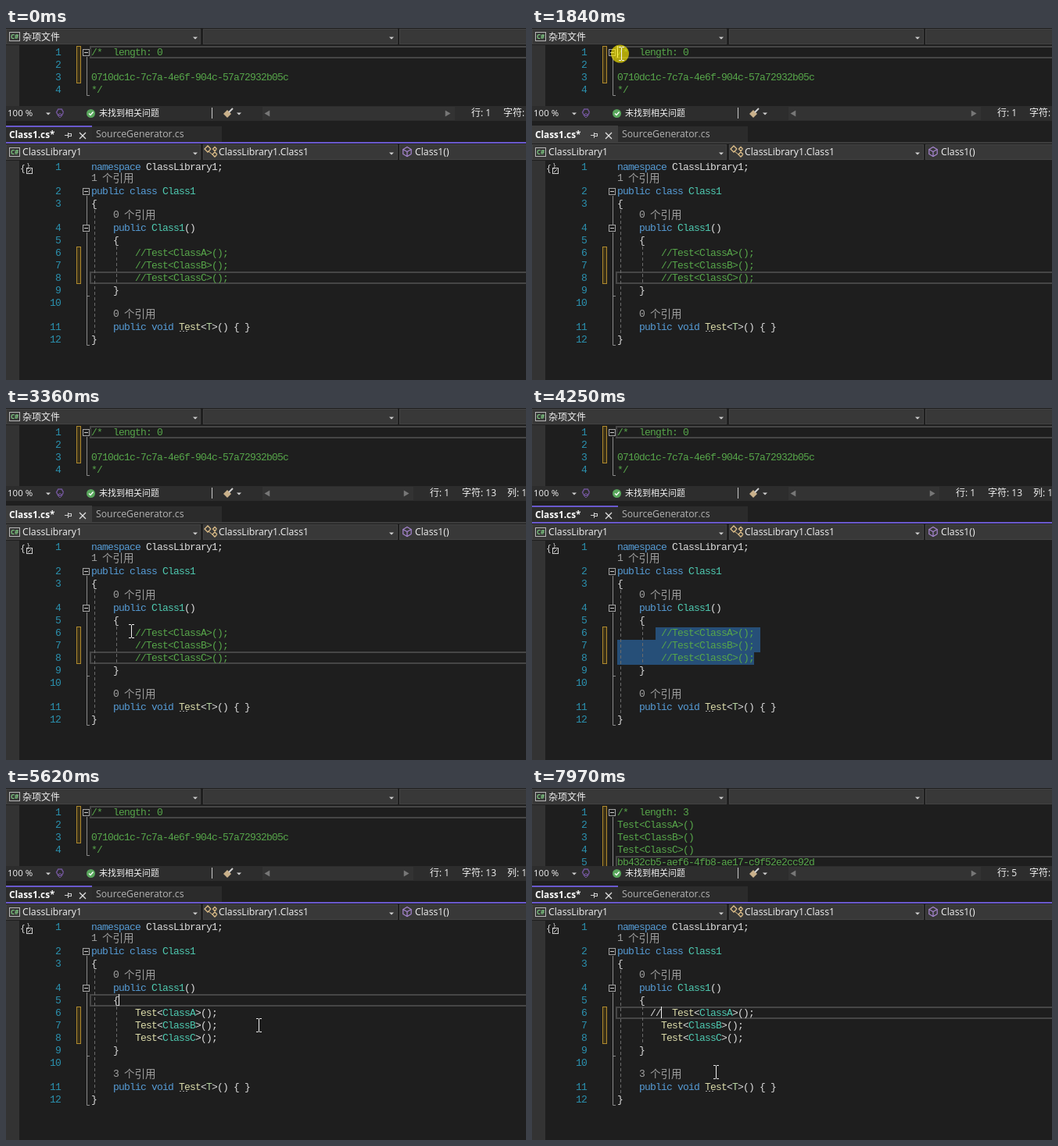
An HTML page with a canvas that plays this animation: 665 by 451 pixels, repeating every 8 s.

```html
<!DOCTYPE html>
<html lang="zh">
<head>
<meta charset="utf-8">
<style>
html, body { margin: 0; width: 100%; height: 100%; overflow: hidden; background: #1e1e1e; }
canvas { display: block; }
</style>
</head>
<body>
<canvas id="stage" width="665" height="451"></canvas>
<script>
const g = document.getElementById('stage').getContext('2d');
const W = 665, H = 451, LOOP = 8000;
const COL = 7, ROW = 16, LEFT = 109, TOP = 31;
const CJK = '"Noto Sans CJK SC", "Noto Sans CJK", sans-serif';
const MONO = '13px "Liberation Mono", monospace';
const UI = '12.25px "Open Sans", ' + CJK;
const STATUS = '12px "Open Sans", ' + CJK;
const INK = { k: '#569cd6', c: '#4ec9b0', g: '#57a64a', p: '#dcdcdc', m: '#dcdcaa', t: '#b8d7a3' };
const WHITE = '#f1f1f1', PALE = '#d0d0d0', GREY = '#8a8a8a', SELECTED = '#264f78';
const KEY = 70, BLINK = 565;

// Moments of the story, in ms
const T = {
  hover: 1170, leave: 1370, topClick: 1640, topDrag: 1860, topDrop: 2390,
  pick: 3560, drop: 3850, uncomment: 4580, place: 5180, counted: 5620,
  generated: 5760, reclick: 6690, type: 7830
};

// Pointer moves: begin, end, x, y
const START = [618, 462];
const MOVES = [
  [330, 1100, 112, 38], [1100, T.hover, 101, 32], [T.leave, 1440, 114, 33],
  [T.topDrag, T.topDrop, 205, 25], [2460, 3160, 160, 286],
  [T.pick, T.drop, 285, 320], [3900, 4240, 120, -15], [4250, 4250, 680, 112],
  [4700, 5150, 330, 272], [5250, 5350, 323, 304], [6250, 6640, 155, 290], [6830, 6970, 235, 364]
];
const PRESSES = [[T.topClick, T.topDrop], [T.pick, T.drop], [T.place, 5270], [T.reclick, 6830]];

const within = (t, a, b) => t >= a && t < b;
const clamp = (v, a, b) => Math.max(a, Math.min(b, v));
const snap = x => LEFT + Math.round((x - LEFT) / COL) * COL;

function pointerAt(t) {
  return MOVES.reduce(([x, y], [a, b, x1, y1]) => {
    if (t < a) return [x, y];
    const u = t >= b ? 1 : (t - a) / (b - a), e = u * u * (3 - 2 * u);
    return [x + (x1 - x) * e, y + (y1 - y) * e];
  }, START);
}

function rect(x, y, w, h, color) {
  g.fillStyle = color;
  g.fillRect(x, y, w, h);
}

function frame(x, y, w, h, color, width = 1) {
  g.strokeStyle = color;
  g.lineWidth = width;
  g.strokeRect(x, y, w, h);
}

function line(points, color, width = 1, dash = []) {
  g.strokeStyle = color;
  g.lineWidth = width;
  g.setLineDash(dash);
  g.beginPath();
  points.forEach(([x, y]) => g.lineTo(x, y));
  g.stroke();
  g.setLineDash([]);
}

// Corners of a regular polygon, the first one at the given angle
const corners = (x, y, r, n, turn) => Array.from({ length: n + 1 }, (_, i) => {
  const a = turn + i * 2 * Math.PI / n;
  return [x + r * Math.cos(a), y + r * Math.sin(a)];
});

function fill(points, color) {
  g.fillStyle = color;
  g.beginPath();
  points.forEach(([x, y]) => g.lineTo(x, y));
  g.fill();
}

function disc(x, y, r, color) {
  g.fillStyle = color;
  g.beginPath();
  g.arc(x, y, r, 0, 7);
  g.fill();
}

function text(s, x, y, color = WHITE, font = UI) {
  g.font = font;
  g.fillStyle = color;
  g.fillText(s, x, y);
}

// Each run starts with its colour key; y is the middle of the row.
function code(x, y, runs) {
  g.letterSpacing = '-0.8px';
  for (const run of runs) {
    text(run.slice(1), x, y + 4, INK[run[0]], MONO);
    x += (run.length - 1) * COL;
  }
  g.letterSpacing = '0px';
}

function lineNumber(n, y) {
  g.letterSpacing = '-0.8px';
  text(n, 70 - String(n).length * COL, y + 4, '#2b91af', MONO);
  g.letterSpacing = '0px';
}

function references(n, x, y) {
  text(n, x, y + 4, '#a0a0a0', MONO);
  text('个引用', x + 2 * COL, y + 5, '#a0a0a0', '300 13.5px ' + CJK);
}

function foldBox(y) {
  rect(98, y - 4, 10, 10, '#1e1e1e');
  frame(98.5, y - 3.5, 8, 8, '#a5a5a5');
  rect(100, y, 5, 1, PALE);
}

const foldEnd = (from, y, color = GREY) => line([[103.5, from], [103.5, y + 7.5], [107, y + 7.5]], color);
const guide = (x, from, to) => line([[x, from], [x, to]], '#6a6a6a', 1, [4, 3]);

function changeBar(y, h) {
  rect(90, y, 6, h, '#3a3118');
  frame(90.5, y + 0.5, 5, h - 1, '#b08a2e');
}

const currentLine = y => frame(108, y - 7, W, 14, '#464646', 2);

function caret(t, since, x, y) {
  if (Math.floor((t - since) / BLINK) % 2 === 0) rect(x, y - 8, 1, 15, WHITE);
}

const down = (x, y) => fill([[x - 3, y - 1.5], [x + 3, y - 1.5], [x, y + 1.5]], PALE);

function navBar(y) {
  rect(0, y, W, 22, '#1f1f1f');
  for (const x of [0, 252, 503]) {
    rect(x, y + 1, 249, 20, '#383838');
    frame(x + 0.5, y + 1.5, 248, 19, '#424242');
  }
  down(242, y + 13);
  down(493, y + 13);
  frame(4.5, y + 5.5, 13, 11, '#b8b8b8');
  text('C#', 6, y + 14, '#7cc47f', 'bold 8px "Open Sans", sans-serif');
}

function topEditor(t, px) {
  const made = t >= T.generated;
  const end = clamp(snap(px), LEFT, 200);
  const calls = ['A', 'B', 'C'].map(c => `Test<Class${c}>()`);
  const lines = made
    ? ['/*  length: 3', ...calls, 'bb432cb5-aef6-4fb8-ae17-c9f52e2cc92d']
    : ['/*  length: 0', '', '0710dc1c-7c7a-4e6f-904c-57a72932b05c', '*/'];

  rect(0, 22, 17, 78, '#333333');
  if (within(t, T.topDrag, T.topDrop + 2 * KEY)) rect(LEFT, 23, end - LEFT, ROW, SELECTED);
  else currentLine(made ? TOP + 4 * ROW : TOP);
  changeBar(23, (made ? 5 : 3) * ROW);
  foldEnd(36, TOP + (lines.length - 1) * ROW, within(t, T.hover, T.leave) ? WHITE : GREY);
  foldBox(TOP);
  lines.forEach((s, i) => {
    lineNumber(i + 1, TOP + i * ROW);
    code(LEFT, TOP + i * ROW, ['g' + s]);
  });
  if (within(t, T.topClick, T.pick)) caret(t, T.topClick, t < T.topDrag ? LEFT : end, TOP);
}

function statusBar(t) {
  const made = t >= T.generated;
  const wide = t >= 2100 && !made;
  const right = wide ? 511 : 564;
  rect(0, 100, W, 19, '#2d2d2d');
  rect(0, 119, W, 6, '#1f1f1f');
  text('100 %', 2, 113, WHITE, '11.5px "Open Sans", sans-serif');
  down(54, 110);
  line(corners(69, 108, 4.5, 6, 0), '#6f5496', 1.5);
  line(corners(69, 112, 3, 4, 0), '#6f5496');
  disc(108.5, 109.5, 5.5, '#58a65c');
  line([[106, 109.5], [108, 111.5], [111.5, 107.5]], '#fff', 1.4);
  text('未找到相关问题', 119, 113, WHITE, '11px ' + CJK);
  rect(263, 102, 1, 14, '#c8c8c8');
  fill(corners(283, 110, 5, 4, 0), '#c9b08a');
  line([[290, 103], [285, 108]], PALE, 2);
  down(298, 110);
  rect(328, 101, right - 318, 17, '#333333');
  fill(corners(335, 109.5, 4.5, 3, Math.PI), '#777777');
  fill(corners(right, 109.5, 4.5, 3, 0), '#777777');
  text(made ? '行: 5' : '行: 1', right + 31, 113, WHITE, STATUS);
  text(wide ? '字符: 13' : made ? '字符: 37' : '字符:', right + 72, 113, WHITE, STATUS);
  if (wide) text('列: 14', right + 130, 113, WHITE, STATUS);
}

function tabs(t) {
  const active = !within(t, T.topClick, T.pick);
  const accent = active ? '#6a5acd' : '#3d3d3d';
  rect(0, 125, W, 23, '#1f1f1f');
  rect(110, 126, 166, 20, '#2b2b2b');
  rect(0, 125, 110, 22, active ? '#2d2d2d' : '#3d3d3d');
  rect(0, 125, 110, 2, accent);
  text('Class1.cs*', 4, 141, '#fff', 'bold 11.8px "Open Sans", sans-serif');
  text('SourceGenerator.cs', 115, 140, '#b4b4b4');
  rect(75, 137, 4, 1, PALE);
  rect(79, 134, 1, 7, PALE);
  frame(79.5, 135.5, 4, 3, PALE);
  for (const s of [-4, 4]) line([[98 - s, 134], [98 + s, 142]], '#e0e0e0', 1.3);

  navBar(148);
  rect(0, 146, W, 2, accent);
  text('ClassLibrary1', 21, 163);
  text('ClassLibrary1.Class1', 272, 163);
  text('Class1()', 523, 163);
  for (const [x, y, r] of [[258, 155, 4], [267, 155, 2.5], [267, 162, 3]])
    line(corners(x, y, r, 4, 0), '#e0c08a', 1.3);
  line([[259, 158], [264, 162]], '#e0c08a');
  const cube = corners(513, 158.5, 6, 6, Math.PI / 6);
  line(cube, '#a987d3', 1.2);
  for (const i of [1, 3, 5]) line([[513, 158.5], cube[i]], '#a987d3', 1.2);
}

// Rows of the class file: indent, reference count or null, coloured runs
function rows(t) {
  const typed = clamp(Math.floor((t - T.type) / KEY), 0, 2);
  const calls = ['A', 'B', 'C'].map((name, i) => {
    const cls = 'Class' + name;
    return [1.5, null, ...(t < T.uncomment
      ? [`g  //Test<${cls}>();`]
      : ['p' + '/'.repeat(i ? 0 : typed) + '  ', 'mTest', 'p<', 'c' + cls, 'p>();'])];
  });
  return [
    [0, null, 'knamespace', 'p ClassLibrary1;'],
    [0, 1, 'kpublic class ', 'cClass1'],
    [0, null, 'p{'],
    [1, 0, 'kpublic ', 'cClass1', 'p()'],
    [1, null, 'p{'],
    ...calls,
    [1, null, 'p}'],
    [0, null],
    [1, t < T.counted ? 0 : 3, 'kpublic void ', 'mTest', 'p<', 'tT', 'p>() { }'],
    [0, null, 'p}']
  ];
}

function selection(t, px, py) {
  const last = clamp(Math.round((py - 288) / ROW), 0, 2);
  const row = t < T.drop ? last : 2;
  const over = t < T.uncomment ? 0 : 2 * COL;
  for (let i = 0; i <= row; i++) {
    const x = i ? LEFT : 158;
    const end = i < row ? 292 - over : t < T.drop ? Math.min(snap(px), 284) : 284 - over;
    rect(x, 281 + i * ROW, Math.max(0, end - x), ROW, SELECTED);
  }
}

function bottomEditor(t, px, py) {
  rect(0, 170, 17, H, '#333333');
  text('{', 19, 184, PALE, '13px "Open Sans", sans-serif');
  text('}', 27, 180, PALE, '9px "Open Sans", sans-serif');
  frame(26.5, 179.5, 7, 7, PALE);
  line([[28, 185], [32, 181]], PALE);

  if (within(t, T.pick, T.place)) selection(t, px, py);
  else currentLine(t < T.pick ? 320 : t < T.reclick ? 272 : 288);

  changeBar(280, 3 * ROW);
  foldEnd(209, 399);
  foldEnd(256, 336);
  foldBox(209);
  foldBox(256);
  guide(113.5, 233, 392);
  guide(141.5, 280, 329);

  let y = 178 - ROW;
  rows(t).forEach(([indent, refs, ...runs], i) => {
    const x = LEFT + indent * 4 * COL;
    y += refs === null ? ROW : 31;
    if (refs !== null) references(refs, x, y - 17);
    lineNumber(i + 1, y);
    code(x, y, runs);
  });
  for (let i = 0; i < 3; i++) rect(222 + i * 4, 388, 2, 1, '#a0a0a0');

  if (t >= T.reclick) caret(t, T.reclick, 151 + COL * clamp(Math.floor((t - T.type) / KEY), 0, 2), 288);
  else if (t >= T.place) caret(t, T.place, 144, 272);
  else if (t >= T.drop) caret(t, T.pick, 284, 320);
}

function pointer(t, px, py) {
  const x = Math.round(px), y = Math.round(py);
  if (PRESSES.some(([a, b]) => within(t, a, b))) disc(x - 1.5, y, 11.5, 'rgba(255,238,0,.65)');
  if (within(t, T.hover, T.leave)) {
    fill([[x, y], [x, y + 16], [x + 4, y + 12], [x + 11, y + 11]], '#fff');
    line([[x + 4, y + 10], [x + 8, y + 18]], '#fff', 2);
    return;
  }
  rect(x, y - 8, 1, 16, WHITE);
  for (const edge of [y - 9, y + 8])
    for (const side of [x - 3, x + 1]) rect(side, edge, 3, 1, WHITE);
}

function draw(t) {
  const [px, py] = pointerAt(t);
  rect(0, 0, W, H, '#1e1e1e');
  topEditor(t, px);
  navBar(0);
  text('杂项文件', 21, 16, WHITE, '12px ' + CJK);
  statusBar(t);
  tabs(t);
  bottomEditor(t, px, py);
  pointer(t, px, py);
}

const start = performance.now();
function tick() {
  draw((performance.now() - start) % LOOP);
  requestAnimationFrame(tick);
}
tick();
</script>
</body>
</html>
```
